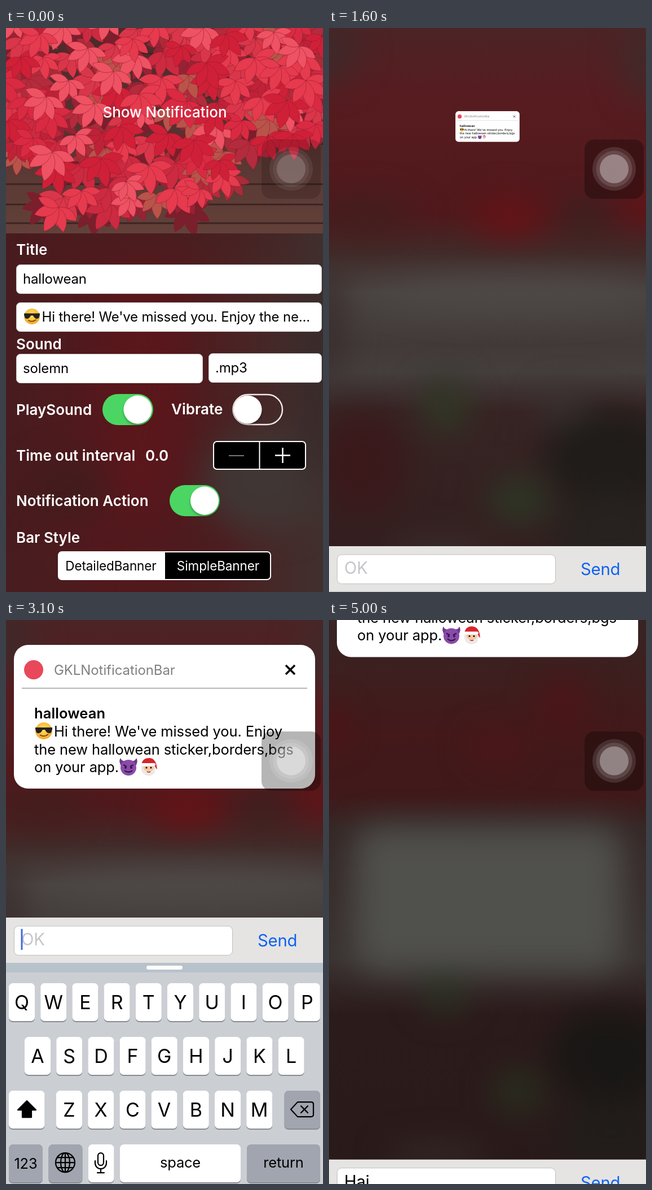
Animation of 562x997 px, one loop 5.1 s. Source, as an HTML page:

```html
<!DOCTYPE html>
<html lang="en">
<head>
<meta charset="utf-8">
<title>Notification bar demo</title>
<style>
html, body { margin: 0; width: 100%; height: 100%; overflow: hidden; background: #2a1a1a; }
svg { display: block; width: 562px; height: 997px; }
text { font-family: Inter, "Open Sans", sans-serif; font-size: 25.5px; white-space: pre; }
.label { font-size: 26px; font-weight: 600; fill: #fff; }
.field { fill: #fff; stroke: #ccc; stroke-width: 1; }
.value { font-size: 24px; letter-spacing: -.17px; }
.body { letter-spacing: -.1px; }
.seg { font-size: 22.5px; letter-spacing: -.1px; text-anchor: middle; }
.input { font-size: 29.3px; letter-spacing: -.2px; }
.key { text-anchor: middle; font-size: 34px; }
.word { text-anchor: middle; letter-spacing: -.2px; }
.soft { filter: url(#soft); }
.line { fill: none; stroke: #000; stroke-width: 2.2; stroke-linejoin: round; stroke-linecap: round; }
</style>
</head>
<body>
<svg viewBox="0 0 562 997" xmlns="http://www.w3.org/2000/svg">
<defs>
  <filter id="soft" filterUnits="userSpaceOnUse" x="-120" y="-120" width="802" height="1237" color-interpolation-filters="sRGB">
    <feGaussianBlur stdDeviation="28"/>
  </filter>
  <filter id="drop" x="-20%" y="-20%" width="140%" height="150%">
    <feDropShadow dx="0" dy="3" stdDeviation="2" flood-opacity=".3"/>
  </filter>
  <clipPath id="photoBox"><path d="M0 0h562v363H0z"/></clipPath>
  <clipPath id="panelBox"><path d="M0 363h562v634H0z"/></clipPath>
  <clipPath id="segBox"><rect x="93" y="926" width="376" height="49" rx="6"/></clipPath>
  <linearGradient id="wood" x2="0" y2="1">
    <stop stop-color="#4c2a2a"/><stop offset=".5" stop-color="#553330"/><stop offset="1" stop-color="#63413a"/>
  </linearGradient>
  <linearGradient id="panel">
    <stop stop-color="#471c1f"/><stop offset=".3" stop-color="#52191d"/>
    <stop offset=".55" stop-color="#511a1d"/><stop offset="1" stop-color="#40302e"/>
  </linearGradient>
  <linearGradient id="dim" x2="0" y2="1">
    <stop stop-color="#4c2426"/><stop offset=".12" stop-color="#571c20"/><stop offset=".33" stop-color="#50191c"/>
    <stop offset=".4" stop-color="#412b29"/><stop offset=".47" stop-color="#4a4543"/><stop offset=".56" stop-color="#423a39"/>
    <stop offset=".61" stop-color="#443e3d"/><stop offset=".68" stop-color="#372424"/><stop offset="1" stop-color="#331d1e"/>
  </linearGradient>
  <linearGradient id="dim2" x2="0" y2="1">
    <stop stop-color="#382423"/><stop offset=".2" stop-color="#43191a"/><stop offset=".31" stop-color="#40191a"/>
    <stop offset=".37" stop-color="#352826"/><stop offset=".6" stop-color="#3a3331"/>
    <stop offset=".7" stop-color="#2c1b1b"/><stop offset="1" stop-color="#291a1a"/>
  </linearGradient>
  <radialGradient id="sun" cx=".5" cy=".4" r=".6">
    <stop stop-color="#ffe45c"/><stop offset="1" stop-color="#f3a82c"/>
  </radialGradient>
  <g id="cool">
    <circle r="15" fill="url(#sun)"/>
    <path d="M-15-6H15V-3L13 3Q7 7 2-2H-2Q-7 7-13 3L-15-3z" fill="#26211f"/>
    <path d="M-7 7Q0 12 8 6" fill="none" stroke="#7a4312" stroke-width="2"/>
  </g>
  <g id="imp">
    <path d="M-13-2Q-18-11-14-16Q-12-10-6-11H6Q12-10 14-16Q18-11 13-2z" fill="#6d3a8c"/>
    <circle cy="1" r="14" fill="#8a4ba8"/>
    <path d="M-9-4L-3-1M9-4L3-1M-7 6Q0 12 7 6" fill="none" stroke="#35174a" stroke-width="2.2"/>
    <circle cx="-5" cy="1" r="2" fill="#35174a"/><circle cx="5" cy="1" r="2" fill="#35174a"/>
  </g>
  <g id="santa">
    <circle cy="2" r="13.5" fill="#eee9e6"/>
    <ellipse cy="1" rx="9.5" ry="7" fill="#f4c9a4"/>
    <path d="M-13-4Q-11-17 2-16Q14-15 15 5L10-3z" fill="#d6252b"/>
    <rect x="-14" y="-7" width="26" height="5" rx="2.5" fill="#fff"/><circle cx="14" cy="7" r="3.5" fill="#fff"/>
    <circle cx="-4" cy="1" r="1.5"/><circle cx="4" cy="1" r="1.5"/>
    <path d="M-3 8Q0 10 3 8" fill="none" stroke="#a33" stroke-width="1.6"/>
  </g>
</defs>

<g id="form">
  <g clip-path="url(#photoBox)">
    <path d="M0 0h562v363H0z" fill="url(#wood)"/>
    <path d="M0 45H562M0 122H562M0 205H562M0 276H562M0 312H562M0 345H562" stroke="#3d2423" stroke-width="3"/>
    <g id="leaves"></g>
  </g>
  <text id="show" class="label" x="281.5" y="158" text-anchor="middle" style="font-weight:500">Show Notification</text>

  <g clip-path="url(#panelBox)">
    <path d="M0 363h562v634H0z" fill="url(#panel)"/>
    <g class="soft">
      <ellipse cx="300" cy="365" rx="230" ry="16" fill="#432223"/>
      <ellipse cx="240" cy="640" rx="70" ry="230" fill="#5a171c"/>
      <ellipse cx="110" cy="810" rx="70" ry="50" fill="#421c1d"/>
      <ellipse cx="460" cy="800" rx="110" ry="90" fill="#403634"/>
      <ellipse cx="550" cy="620" rx="40" ry="190" fill="#392b2a"/>
      <ellipse cx="350" cy="940" rx="60" ry="60" fill="#4b1c1f"/>
      <ellipse cx="60" cy="960" rx="80" ry="30" fill="#491f20"/>
    </g>
  </g>
  <text class="label" x="18" y="401">Title</text>
  <text class="label" x="18" y="568">Sound</text>
  <text class="label" x="18" y="684">PlaySound</text>
  <text class="label" x="293" y="683">Vibrate</text>
  <text class="label" x="18" y="765">Time out interval</text>
  <text class="label" x="247" y="765">0.0</text>
  <text class="label" x="18" y="845">Notification Action</text>
  <text class="label" x="18" y="910">Bar Style</text>

  <rect class="field" x="18.5" y="418.5" width="541" height="51" rx="7"/>
  <rect class="field" x="18.5" y="485.5" width="541" height="51" rx="7"/>
  <rect class="field" x="18.5" y="576.5" width="330" height="51" rx="7"/>
  <rect class="field" x="359.5" y="575.5" width="200" height="51" rx="7"/>
  <text class="value" x="30" y="452">hallowean</text>
  <use href="#cool" transform="translate(46 510) scale(.93)"/>
  <text class="value" x="63.5" y="519">Hi there! We've missed you. Enjoy the ne...</text>
  <text class="value" x="30" y="610">solemn</text>
  <text class="value" x="371" y="609">.mp3</text>

  <rect x="171" y="647" width="90" height="55" rx="27.5" fill="#4bd663"/>
  <circle cx="233.5" cy="674.5" r="25" fill="#fff" filter="url(#drop)"/>
  <rect x="402.5" y="648" width="87.5" height="53" rx="26.5" fill="none" stroke="#f3e8e8" stroke-width="2.5"/>
  <circle cx="428.5" cy="674.5" r="25" fill="#fff" filter="url(#drop)"/>
  <rect x="290" y="808" width="89" height="55" rx="27.5" fill="#4bd663"/>
  <circle cx="352" cy="835.5" r="25" fill="#fff" filter="url(#drop)"/>

  <rect x="368" y="731" width="163" height="49" rx="6" stroke="#fff" stroke-width="2"/>
  <path d="M449.5 731v49" stroke="#fff" stroke-width="2"/>
  <path d="M395 756h27" stroke="#777" stroke-width="2"/>
  <path d="M477 755.5h27M490.5 742v27" stroke="#fff" stroke-width="2.5"/>

  <rect x="93" y="926" width="376" height="49" rx="6" stroke="#fff" stroke-width="2"/>
  <path d="M92 926h190v49H92z" fill="#fff" clip-path="url(#segBox)"/>
  <text class="seg" x="186" y="959">DetailedBanner</text>
  <text class="seg" x="376" y="959" fill="#fff">SimpleBanner</text>
</g>

<g id="blur">
  <path d="M0 0h562v997H0z" fill="url(#dim)"/>
  <g class="soft">
    <ellipse cx="0" cy="40" rx="50" ry="60" fill="#40292a"/>
    <ellipse cx="562" cy="60" rx="40" ry="70" fill="#412a2a"/>
    <ellipse cx="320" cy="335" rx="65" ry="35" fill="#661317"/>
    <ellipse cx="560" cy="310" rx="30" ry="40" fill="#651418"/>
    <ellipse cx="455" cy="335" rx="45" ry="30" fill="#382322"/>
    <ellipse cx="60" cy="330" rx="90" ry="30" fill="#411f1e"/>
    <ellipse cx="0" cy="520" rx="26" ry="110" fill="#392c2b"/>
    <ellipse cx="330" cy="470" rx="230" ry="28" fill="#4e4947"/>
    <ellipse cx="207" cy="668" rx="42" ry="48" fill="#303826"/>
    <ellipse cx="420" cy="670" rx="45" ry="30" fill="#3b3533"/>
    <ellipse cx="500" cy="760" rx="120" ry="85" fill="#1f1c19"/>
    <ellipse cx="500" cy="890" rx="110" ry="70" fill="#27221f"/>
    <ellipse cx="60" cy="770" rx="80" ry="90" fill="#3b191b"/>
    <ellipse cx="337" cy="834" rx="52" ry="42" fill="#2d3726"/>
    <ellipse cx="200" cy="930" rx="90" ry="25" fill="#39302c"/>
  </g>
</g>
<g id="blurOut">
  <path d="M0 0h562v997H0z" fill="url(#dim2)"/>
  <g class="soft">
    <ellipse cx="0" cy="190" rx="30" ry="30" fill="#521214"/>
    <ellipse cx="415" cy="150" rx="45" ry="50" fill="#4c1518"/>
    <ellipse cx="300" cy="225" rx="50" ry="30" fill="#4d1619"/>
    <rect x="45" y="365" width="475" height="255" rx="40" fill="#50504d"/>
    <ellipse cx="205" cy="660" rx="40" ry="35" fill="#283022"/>
    <ellipse cx="500" cy="770" rx="110" ry="85" fill="#191715"/>
    <ellipse cx="500" cy="910" rx="100" ry="60" fill="#211d1b"/>
    <ellipse cx="335" cy="834" rx="45" ry="34" fill="#28301f"/>
    <ellipse cx="190" cy="945" rx="90" ry="20" fill="#352a26"/>
  </g>
</g>

<g id="card">
  <rect x="14" y="44" width="534" height="254" rx="25" fill="#fff"/>
  <circle cx="49" cy="88" r="17" fill="#e8485a"/>
  <text x="85" y="97" fill="#808080" style="font-size:24px;letter-spacing:-.08px">GKLNotificationBar</text>
  <path d="M496 80l16 16m0-16l-16 16" stroke="#000" stroke-width="3.5"/>
  <path d="M28 120.5h506" stroke="#777"/>
  <text x="50" y="174" style="font-weight:600;letter-spacing:.1px">hallowean</text>
  <use href="#cool" x="67" y="196"/>
  <text class="body" x="85" y="206">Hi there! We've missed you. Enjoy</text>
  <text class="body" x="50" y="238">the new hallowean sticker,borders,bgs</text>
  <text class="body" x="50" y="269">on your app.</text>
  <use href="#imp" x="217" y="260"/>
  <use href="#santa" x="253" y="260"/>
</g>

<g id="dock">
  <path d="M0 523h562v81H0z" fill="#e5e4e2"/>
  <rect x="14.5" y="538" width="387" height="51.5" rx="8" fill="#fff" stroke="#bfbfc1"/>
  <text id="hint" class="input" x="27" y="572" fill="#c6c6ca">OK</text>
  <text id="typed" class="input" x="27" y="572"></text>
  <path id="caret" d="M0 543v37" stroke="#3d6be2" stroke-width="3"/>
  <text class="input" x="446" y="574" fill="#0f62f2">Send</text>
  <path d="M0 603h562v500H0z" fill="#cbced3"/>
  <path d="M0 603h562v17H0z" fill="#b8c2cb"/>
  <rect x="249" y="608" width="64" height="7" rx="3.5" fill="#fff"/>
  <g id="keys"></g>
  <path id="shift" class="line" d="M37 847L53 863H45V876H29V863H21z"/>
  <path class="line" d="M517 849H541Q545 849 545 853V871Q545 875 541 875H517L505 862zM523 856l12 12m0-12l-12 12"/>
  <g class="line">
    <circle cx="105" cy="956" r="17"/><ellipse cx="105" cy="956" rx="8" ry="17"/>
    <path d="M105 939v34M88 956h34M91 947h28M91 965h28"/>
    <rect x="163" y="939" width="10" height="22" rx="5"/>
    <path d="M158 953v4a10 10 0 0 0 20 0v-4M168 967v7M162 974h12"/>
  </g>
</g>

<g id="touch">
  <rect x="453" y="197" width="105" height="105" rx="17" opacity=".29"/>
  <g fill="#fff">
    <circle cx="505.5" cy="249" r="38.5" opacity=".12"/>
    <circle cx="505.5" cy="249" r="32" opacity=".12"/>
    <circle cx="505.5" cy="249" r="25.5" opacity=".32"/>
  </g>
</g>
</svg>

<script>
const LOOP = 5100, STEP = 100;
const $ = id => document.getElementById(id);
const el = {};
for (const id of ['show', 'blur', 'blurOut', 'card', 'dock', 'hint', 'typed', 'caret', 'shift', 'touch']) el[id] = $(id);

function add(parent, tag, attrs, text) {
  const node = document.createElementNS('http://www.w3.org/2000/svg', tag);
  for (const name in attrs) node.setAttribute(name, attrs[name]);
  if (text) node.textContent = text;
  return parent.appendChild(node);
}

// Flat creeper foliage: drooping five-finger leaves, thinning out towards the lower right.
let seed = 11;
const rnd = () => (seed = seed * 16807 % 2147483647) / 2147483647;
const layers = [
  ['#7a1f2c', '#962335', '#a92c38'],
  ['#bf2238', '#cc2a40', '#b32b3c', '#d9364a', '#b8544a'],
  ['#d92a42', '#e63a4e', '#cf2038', '#ee5263']
];
const depth = x => x < 60 ? 255 : x < 330 ? 350 : x < 400 ? 310 : x < 470 ? 250 : 215;
layers.forEach((tones, layer) => {
  for (let i = 0; i < 70; i++) {
    const x = (i * .7549 + layer * .3) % 1 * 580 - 10;
    const y = (i * .5698 + layer * .4) % 1 * depth(x) - 25;
    const size = 38 + rnd() * 16, tilt = rnd() * 80 - 40;
    const leaf = add($('leaves'), 'g', {
      transform: `translate(${x.toFixed(1)} ${y.toFixed(1)}) rotate(${tilt.toFixed(1)})`,
      fill: tones[Math.floor(rnd() * tones.length)]
    });
    for (let k = -2; k <= 2; k++) {
      const s = size * (1 - Math.abs(k) * .1), w = s * .42;
      add(leaf, 'path', {
        d: `M0 0Q${w} ${s * .5} 0 ${s}Q${-w} ${s * .5} 0 0`,
        transform: `rotate(${k * 42})`, stroke: '#8d1a2b', 'stroke-width': .8, 'stroke-opacity': .6
      });
    }
  }
});

// Keyboard
const keys = $('keys'), letters = [];
function key(x, y, w, fill = '#fff') {
  add(keys, 'rect', { x, y: y + 2, width: w, height: 67, rx: 7, fill: '#888b91' });
  return add(keys, 'rect', { x, y, width: w, height: 67, rx: 7, fill });
}
const GREY = '#a0a5af';
[['QWERTYUIOP', 5, 639], ['ASDFGHJKL', 33, 734], ['ZXCVBNM', 89, 829]].forEach(([row, x0, y]) =>
  [...row].forEach((ch, i) => {
    const x = x0 + i * 56.2;
    key(x, y, 46);
    const node = add(keys, 'text', { class: 'key', x: x + 23 }, ch);
    letters.push({ node, ch, y });
  }));
const shiftKey = key(5, 829, 63.5);
key(493.5, 829, 63.5, GREY);
key(5, 924, 60, GREY);
key(75.5, 924, 60, GREY);
key(146, 924, 45.5);
key(202, 924, 214);
key(427, 924, 130, GREY);
[['123', 35, 967], ['space', 309, 965], ['return', 492, 965]].forEach(([word, x, y]) =>
  add(keys, 'text', { class: 'word', x, y }, word));

function setCase(upper) {
  for (const { node, ch, y } of letters) {
    node.textContent = upper ? ch : ch.toLowerCase();
    node.setAttribute('y', y + (upper ? 46 : 45));
    node.style.fontSize = upper ? '34px' : '37px';
    node.style.fontWeight = upper ? 400 : 300;
  }
  shiftKey.setAttribute('fill', upper ? '#fff' : GREY);
  el.shift.style.fill = upper ? '#000' : 'none';
}

// Motion
const clamp = v => Math.max(0, Math.min(1, v));
const ramp = (t, from, to) => clamp((t - from) / (to - from));
const smooth = p => p * p * (3 - 2 * p);

function settle(ms) {          // critically damped, 0 to 1
  const x = Math.max(0, ms) * .01826;
  return 1 - Math.exp(-x) * (1 + x);
}
function bounce(ms) {          // underdamped, 0 to 1
  const s = Math.max(0, ms) / 1000, a = 6.5, b = 8.05;
  return 1 - Math.exp(-a * s) * (Math.cos(b * s) + a / b * Math.sin(b * s));
}
const typedAt = t => t < 3400 ? '' : t < 3700 ? 'H' : t < 4200 ? 'Ha' : 'Hai';

function render(t) {
  el.show.style.opacity = t < 600 ? 1 : .18 + .82 * ramp(t, 800, 1000);

  const veil = ramp(t, 1300, 1600);
  el.blur.style.opacity = veil;
  el.blurOut.style.opacity = ramp(t, 4600, 5000);
  el.touch.style.opacity = .55 + .45 * veil;

  const leave = smooth(ramp(t, 4800, 5100));
  const scale = bounce(t - 1525);
  el.card.style.display = scale > 0 ? '' : 'none';
  el.card.setAttribute('transform',
    `translate(281 ${171 + 4 * clamp(1 - scale) - 314 * leave}) scale(${scale}) translate(-281 -171)`);

  const raised = settle(t - 2722) - settle(t - 4575);
  const hidden = 82 * (1 - smooth(veil));
  el.dock.setAttribute('transform', `translate(0 ${393 * (1 - raised) + hidden + 53 * leave})`);

  const text = typedAt(t);
  el.typed.textContent = text;
  el.hint.style.display = text ? 'none' : '';
  el.caret.style.display = t >= 2800 && t < 4600 ? '' : 'none';
  el.caret.setAttribute('transform', `translate(${28 + (text ? el.typed.getComputedTextLength() : 0)} 0)`);
  setCase(!text);
}

const start = performance.now();
let shown = -1;
function tick() {
  // Poses advance ten times a second.
  const t = Math.floor(((performance.now() - start + 8) % LOOP) / STEP) * STEP;
  if (t !== shown) render(shown = t);
  requestAnimationFrame(tick);
}
tick();
</script>
</body>
</html>
```
